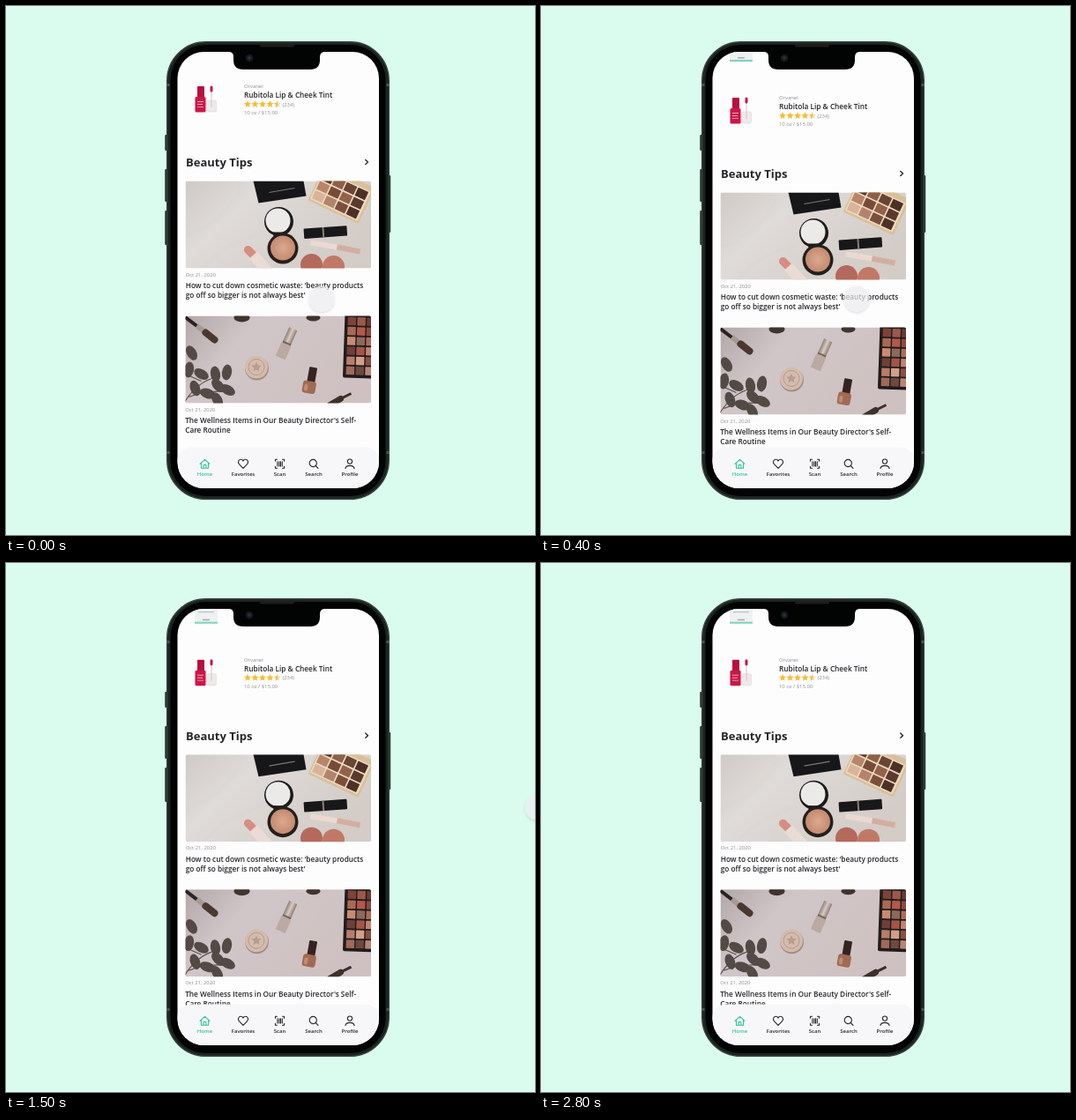
An HTML page for the animation above (3000 ms loop, 600 px wide and 600 px high).

```html
<!DOCTYPE html>
<html lang="en">
<head>
<meta charset="utf-8">
<title>Beauty app scroll</title>
<style>
  html, body { margin: 0; width: 100%; height: 100%; overflow: hidden; background: #dafcee; }
  svg { display: block; width: 100%; height: 100%; }
  text { font-family: "Open Sans", "Noto Sans", sans-serif; fill: #262628; }
  .note { font-size: 5.9px; fill: #8b8b8e; }
  .title { font-size: 8.27px; font-weight: 600; }
  .heading { font-size: 13px; font-weight: 700; }
  .label { font-size: 6px; font-weight: 600; text-anchor: middle; }
  .icon { fill: none; stroke: #262628; stroke-width: 1.1; stroke-linecap: round; stroke-linejoin: round; }
  .active .icon { stroke: #2cc592; }
  .active text { fill: #2cc592; }
</style>
</head>
<body>
<svg id="stage" viewBox="0 0 600 600">
  <defs>
    <clipPath id="screen"><rect x="194.5" y="52" width="228.5" height="495" rx="30"/></clipPath>
    <clipPath id="photo"><rect width="210.5" height="99" rx="2"/></clipPath>
    <linearGradient id="marble" x2="1" y2=".5">
      <stop stop-color="#cfcac6"/><stop offset=".35" stop-color="#dfdbd8"/><stop offset="1" stop-color="#d3ccc7"/>
    </linearGradient>
    <linearGradient id="mauve" x2="1" y2=".4">
      <stop stop-color="#b3a8a8"/><stop offset=".35" stop-color="#d0c6c8"/><stop offset="1" stop-color="#cfc1c1"/>
    </linearGradient>
    <linearGradient id="metal"><stop stop-color="#8f8078"/><stop offset=".5" stop-color="#d8cbc4"/><stop offset="1" stop-color="#8d7d74"/></linearGradient>
    <radialGradient id="blush"><stop stop-color="#dba98f"/><stop offset="1" stop-color="#c48b70"/></radialGradient>
    <filter id="soft" x="-50%" y="-50%" width="200%" height="200%"><feDropShadow dx="0" dy="1.5" stdDeviation="1.8" flood-opacity=".2"/></filter>
  </defs>
  <g id="phone"></g>
  <g clip-path="url(#screen)">
    <rect x="194" y="52" width="230" height="496" fill="#fefdfe"/>
    <g id="feed"></g>
    <g id="tabs"></g>
  </g>
  <g id="notch"></g>
  <g id="cursor" opacity=".72"><circle r="14.5" fill="#ededf0" filter="url(#soft)"/></g>
</svg>
<script>
const LOOP = 3000, STEP = 100;
const $ = id => document.getElementById(id);

const rect = (x, y, w, h, fill, rx = 0, more = "") =>
  `<rect x="${x}" y="${y}" width="${w}" height="${h}" rx="${rx}" fill="${fill}" ${more}/>`;
const disc = (x, y, r, fill, more = "") => `<circle cx="${x}" cy="${y}" r="${r}" fill="${fill}" ${more}/>`;
const poly = (points, fill) => `<polygon points="${points}" fill="${fill}"/>`;
const rod = (d, width, color, cap = "butt") =>
  `<path d="${d}" stroke="${color}" stroke-width="${width}" stroke-linecap="${cap}" fill="none"/>`;
const text = (x, y, cls, str) => `<text x="${x}" y="${y}" class="${cls}">${str}</text>`;
const group = (transform, body) => `<g transform="${transform}">${body}</g>`;

function pans(colors, columns, x, y, dx, dy, w, h) {
  return colors.map((c, i) =>
    rect(x + i % columns * dx, y + Math.floor(i / columns) * dy, w, h, c, .6)).join("");
}

function star(cx, cy, r, fill) {
  const points = Array.from({ length: 10 }, (_, i) => {
    const a = Math.PI * (i / 5 - .5), d = i % 2 ? r * .48 : r;
    return `${(cx + d * Math.cos(a)).toFixed(2)},${(cy + d * Math.sin(a)).toFixed(2)}`;
  });
  return poly(points.join(" "), fill);
}

const photo = (y, body) => group(`translate(203.5 ${y})`, `<g clip-path="url(#photo)">${body}</g>`);

function vanityPhoto() {
  const shades = ["#5a382c", "#8e6049", "#6a4435", "#4d3026",
    "#b98468", "#774b39", "#93624b", "#5b392d",
    "#d9b39c", "#b3836b", "#7c4f3d", "#4f3027"];
  return rect(0, 0, 210.5, 99, "url(#marble)")
    + rod("M0 62Q40 48 62 12M20 99Q44 70 84 60", 5, "#cac5c117", "round")
    + poly("77,0 134,0 137,17 83,25", "#17171a")
    + rod("M95 13L124 8", 1.2, "#77777a")
    + group("translate(139 22) rotate(25)",
        rect(0, -45, 63, 45, "#d8c09a", 2) + rect(1.5, -39, 59, 36.5, "#ead9bd", 1)
        + pans(shades, 4, 3, -37.5, 14.2, 11.7, 12.6, 10))
    + disc(106, 46, 16.5, "#1c1a1a") + disc(105, 45, 14, "#eceae8")
    + rect(100, 58, 12, 5, "#1c1a1a")
    + disc(110.5, 76.5, 17.5, "#241f1d") + disc(110.5, 76, 14, "url(#blush)")
    + group("translate(134 54) rotate(-4)",
        rect(0, 0, 49, 11.5, "#18171a", 1) + rect(21, 0, 2, 11.5, "#8b7c70"))
    + rod("M142 70L172 75", 6, "#ead9d2") + rod("M172 75L198 80", 6, "#d3aea0")
    + disc(143, 95, 12.5, "#b4695b") + disc(168, 97, 12.5, "#c17867")
    + rod("M71 78L78 85", 9, "#d78d81", "round") + rod("M77 84L95 104", 12, "#eadbd5");
}

function tablePhoto() {
  const leaves = [[7, 42, 60], [18, 66, 30], [34, 66, 80], [47, 64, 100], [37, 79, 45],
    [11, 82, 70], [25, 88, 20], [36, 95, 60], [4, 61, 100], [48, 84, 30]];
  const shades = ["#7d4339", "#9a5a49", "#6b3a34", "#a86a54", "#b4584a", "#8c4c40",
    "#c98a73", "#8a6a5d", "#b16b58", "#6e4039", "#a35546", "#c08470",
    "#b87d6a", "#d0a08a", "#8b4f43", "#a06a5a", "#6c4a40", "#b98674"];
  return rect(0, 0, 210.5, 99, "url(#mauve)")
    + rod("M-2 99Q14 74 34 70M4 92Q22 84 46 86M0 66L18 74", 1.2, "#5a504b")
    + leaves.map(([x, y, a]) => `<ellipse rx="9" ry="5.5" fill="#534a46" transform="translate(${x} ${y}) rotate(${a})"/>`).join("")
    + rod("M-2 0L15 13", 4, "#282322") + rod("M13 11L24 20", 6, "#a69a92") + rod("M23 19L33 27", 8, "#4a3830", "round")
    + `<ellipse cx="64" cy="2" rx="9" ry="5" fill="#40342f"/><ellipse cx="145" cy="2" rx="8" ry="4" fill="#40342f"/>`
    + group("translate(115 31) rotate(24)",
        rect(-5, -18, 10, 19, "url(#metal)", 1) + rect(-6, 1, 12, 17, "#baaaa1", 1) + rect(-5, -1, 10, 2, "#75655c"))
    + disc(81, 59.5, 13.5, "#a28d82") + disc(80.5, 58, 13, "#d3bcae")
    + disc(80.5, 58, 9, "none", 'stroke="#b8998a" stroke-width="1"') + star(80.5, 58, 6, "#b99d8d")
    + group("translate(142 74) rotate(10)",
        rect(-4, -16, 9, 17, "#35231f", 1) + rect(-8, 0, 15, 14, "#a06a55", 3) + rect(-6, 4, 4, 8, "#c28d77", 2))
    + group("translate(181 -3) rotate(2)",
        rect(0, 0, 40, 73, "#211b1c", 2) + pans(shades, 3, 3.5, 4, 10.8, 11.2, 9.4, 9.4))
    + rod("M164 101L176 94", 7, "#3e302b", "round") + rod("M176 94L188 88", 3, "#3b2e2b");
}

function product() {
  const bottle = rect(217, 91, 8, 13, "#b80f3d", 1) + rect(214.5, 103, 12, 17.5, "#cb1746", 1.5)
    + rect(217, 108, 7, 1, "#f0a6b8") + rect(217, 111, 6, 1, "#f0a6b8") + rect(217, 114, 7, 1, "#e58ba2")
    + rect(227.5, 107, 11, 13, "#eeeaea", 1.5, 'stroke="#dad5d6" stroke-width=".6"')
    + rod("M233 96V115", 1.1, "#d9c5cb") + rod("M233 92V96", 3, "#c31843", "round");
  const stars = [0, 1, 2, 3, 4].map(i => star(274 + 8.5 * i, 111.5, 4.2, i < 4 ? "#f6bd36" : "#eadfc6")).join("");
  return rect(214, 20, 26, 31, "#eef1f2", 1) + rect(214, 48, 26, 2, "#7fd3bd")
    + rect(218, 36.5, 18, 1, "#aeb8b8") + rect(223, 45, 8, 1.5, "#a4acac")
    + bottle + text(270, 93, "note", "Orvanel")
    + text(270, 104, "title", "Rubitola Lip &amp; Cheek Tint")
    + stars + poly("308,107.3 308,113.5 305.6,114.9 306.1,112.1 304,110.2 306.8,109.8", "#f6bd36")
    + text(313.5, 113.7, "note", "(234)")
    + text(270, 123, "note", "10 oz / $15.00");
}

function feed() {
  return product()
    + text(204, 182, "heading", "Beauty Tips")
    + `<path class="icon" style="stroke-width:1.4" d="M407.8 174.4l2.7 2.6-2.7 2.6"/>`
    + photo(198.5, vanityPhoto())
    + text(203.7, 306.7, "note", "Oct 21, 2020")
    + text(203.7, 320, "title", "How to cut down cosmetic waste: ‘beauty products")
    + text(203.7, 331, "title", "go off so bigger is not always best’")
    + photo(351.5, tablePhoto())
    + text(203.2, 459.7, "note", "Oct 21, 2020")
    + text(203.2, 473, "title", "The Wellness Items in Our Beauty Director's Self-")
    + text(203.2, 484, "title", "Care Routine");
}

function tabs() {
  const items = [
    [225.5, "Home", "M-5.5 0L0-5 5.5 0M-4-1.2V5H4V-1.2M-1.4 5V1.2H1.4V5"],
    [269, "Favorites", "M0 5L-4.6.4C-6.8-2-4.8-5-2.6-5-1.2-5-.4-4.2 0-3.2 .4-4.2 1.2-5 2.6-5 4.8-5 6.8-2 4.6.4Z"],
    [310.5, "Scan", "M-3-5H-5V-3M3-5H5V-3M-3 5H-5V3M3 5H5V3M-2.6-2.6V2.6M-.6-2.6V2.6M1-2.6V2.6M2.8-2.6V2.6"],
    [349, "Search", "M3.4-.8A4.1 4.1 0 1 1-4.8-.8 4.1 4.1 0 1 1 3.4-.8M2.3 2.2L5 5"],
    [390, "Profile", "M2.6-2.7A2.6 2.6 0 1 1-2.6-2.7 2.6 2.6 0 1 1 2.6-2.7M-5 5.2C-4.6 1 4.6 1 5 5.2"]
  ];
  return rect(194, 500.5, 230, 60, "#f7f7f9", 16) + items.map(([x, name, d], i) =>
    `<g class="${i ? "" : "active"}">${group(`translate(${x} 519.3)`, `<path class="icon" d="${d}"/>`)}${text(x, 533.3, "label", name)}</g>`
  ).join("");
}

function phone() {
  const buttons = [[180.3, 146, 18], [180.3, 185, 37], [180.3, 232, 39], [432.7, 192, 65]];
  return buttons.map(([x, y, h]) => rect(x, y, 3.5, h, "#26302d", 1)).join("")
    + rect(182.7, 40.7, 251.6, 518.6, "#1b2321", 44, 'stroke="#36423e" stroke-width="1.4"')
    + [[182, 88], [182, 505], [431.5, 88], [431.5, 505]].map(([x, y]) => rect(x, y, 3.5, 3, "#4a5652")).join("")
    + rect(186.5, 44, 244, 512, "#020303", 40);
}

function notch() {
  return `<path d="M253 51V52Q258 52.3 258 58V61Q258 72 269 72H345Q356 72 356 61V58Q356 52.3 361 52V51Z" fill="#020303"/>`
    + rect(288, 43.5, 39, 3, "#211c1c", 1.5)
    + disc(276, 59, 4.3, "#15191d") + disc(276, 59, 2, "#263038");
}

// Time, x, y
const path = [[0, 358, 332], [800, 358, 332], [1100, 343, 329.5], [1200, 352, 328],
  [1300, 410, 319], [1400, 520, 297], [1500, 603, 277], [1600, 650, 262], [LOOP, 650, 262]];

function cursorAt(t) {
  const i = path.findIndex(p => p[0] > t);
  const [t0, x0, y0] = path[i - 1], [t1, x1, y1] = path[i];
  const k = (t - t0) / (t1 - t0);
  return [x0 + (x1 - x0) * k, y0 + (y1 - y0) * k];
}

function scrollAt(t) {
  const u = Math.min(1, t / 600) ** 1.13;
  return 18.7 * u * u * (3 - 2 * u);
}

function render(t) {
  $("feed").setAttribute("transform", `translate(0 ${scrollAt(t).toFixed(2)})`);
  $("cursor").setAttribute("transform", `translate(${cursorAt(t).join(" ")})`);
}

for (const [id, draw] of Object.entries({ phone, feed, tabs, notch })) $(id).innerHTML = draw();

const start = performance.now();
function tick() {
  const t = (performance.now() - start) % LOOP;
  render(Math.floor(t / STEP) * STEP);
  requestAnimationFrame(tick);
}
tick();
</script>
</body>
</html>
```
